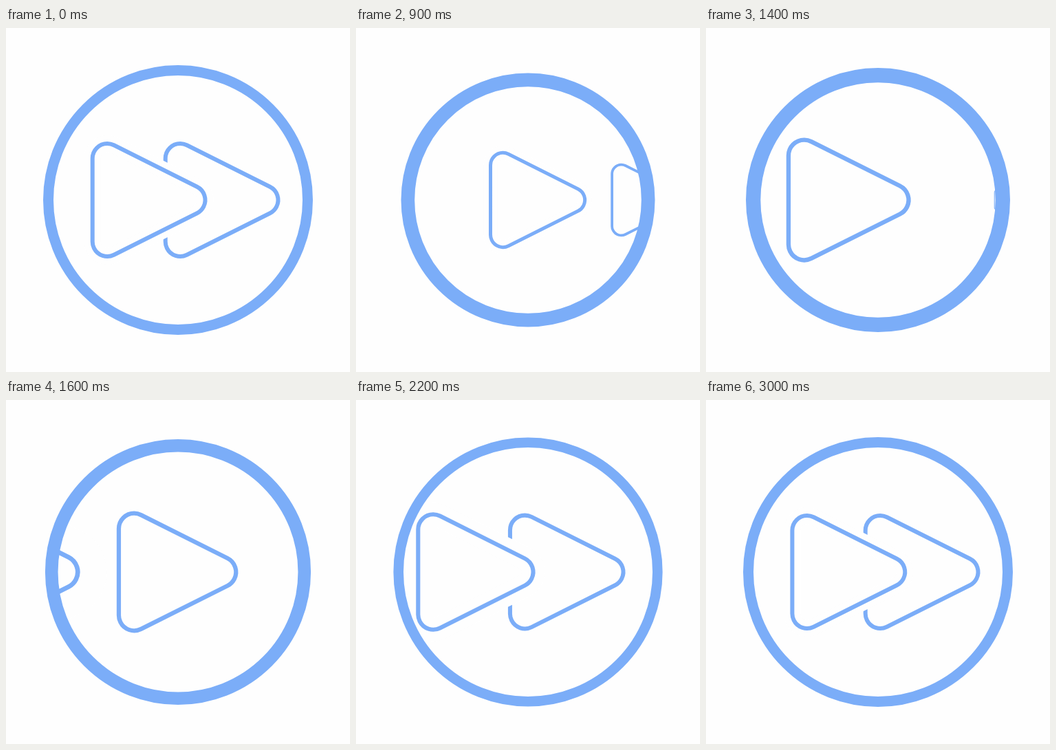
Recreate the animation shown at these times as an HTML page with a canvas. Size 500x500 px, loop 3.7 s.

```html
<!DOCTYPE html>
<html lang="en">
<head>
<meta charset="utf-8">
<title>Fast forward</title>
<style>
  html, body { margin: 0; width: 100%; height: 100%; overflow: hidden; background: #fefefe; }
  canvas { display: block; width: 100vmin; height: 100vmin; }
</style>
</head>
<body>
<canvas width="500" height="500"></canvas>
<script>
const ctx = document.querySelector('canvas').getContext('2d');
const BLUE = '#7badf8', PAPER = '#fefefe';
const LOOP = 3700, CENTER = 250;
const LEFT_X = 122.7, RIGHT_X = 228.7;   // resting left edges
const LEFT_OUT_DELAY = 1.3, LEFT_IN_DELAY = 3.8;

// [step, value] pairs for the ring
const RING_RADIUS = [[0, 196], [1, 193.3], [4, 184.5], [5.5, 184], [9, 192], [13, 194.2], [17, 195.6], [18, 196]];
const RING_WIDTH = [[0, 15], [1, 15.4], [4, 19.7], [6.5, 22.5], [9, 21.3], [13, 16], [17, 14.6], [24, 15]];

function valueAt(keys, step) {
  const next = keys.findIndex(([s]) => s >= step);
  if (next < 0) return keys[keys.length - 1][1];
  if (next === 0) return keys[0][1];
  const [s0, v0] = keys[next - 1], [s1, v1] = keys[next];
  return v0 + (v1 - v0) * (step - s0) / (s1 - s0);
}

// Rounded triangle whose left outer edge is at x; halo clears what lies behind it
function triangle(x, scale, halo = 0) {
  const r = 21.5, tilt = Math.PI / 2 - Math.atan(0.5);
  ctx.save();
  ctx.translate(x, CENTER);
  ctx.scale(scale, scale);
  ctx.beginPath();
  ctx.arc(24.5, -60.5, r, Math.PI, 2 * Math.PI - tilt);
  ctx.arc(145.3, 0, r, -tilt, tilt);
  ctx.arc(24.5, 60.5, r, tilt, Math.PI);
  ctx.closePath();
  ctx.fillStyle = ctx.strokeStyle = PAPER;
  ctx.fill();
  if (halo) {
    ctx.lineWidth = 2 * halo;
    ctx.stroke();
  }
  ctx.strokeStyle = BLUE;
  ctx.lineWidth = 6;
  ctx.stroke();
  ctx.restore();
}

// Accelerates to the right while shrinking
function leave(x, step, halo) {
  const d = Math.min(296, 12 * Math.max(0, step) ** 1.78);
  triangle(x + d, Math.max(0.18, 1 - 0.002 * d - 0.0000045 * d * d), halo);
}

// Slides in from the left and settles, slightly oversized on the way
function enter(x, step, halo) {
  const rest = 112 * (Math.max(0, 24 - step) / 15) ** 3.5 + 12 * Math.max(0, 9 - step) ** 2;
  triangle(x - rest, 1 + rest * 0.1 / 170, halo && halo + rest * 0.125);
}

function draw(step) {
  const radius = valueAt(RING_RADIUS, step), width = valueAt(RING_WIDTH, step);
  ctx.fillStyle = PAPER;
  ctx.fillRect(0, 0, 500, 500);

  ctx.save();
  ctx.beginPath();
  ctx.arc(CENTER, CENTER, radius - width / 2, 0, 2 * Math.PI);
  ctx.clip();
  if (step < 10) {
    leave(RIGHT_X, step);
    leave(LEFT_X, step - LEFT_OUT_DELAY, 12);
  }
  if (step > 4) {
    enter(RIGHT_X, step);
    enter(LEFT_X, step - LEFT_IN_DELAY, 12);
  }
  ctx.restore();

  ctx.beginPath();
  ctx.arc(CENTER, CENTER, radius - width / 2, 0, 2 * Math.PI);
  ctx.strokeStyle = BLUE;
  ctx.lineWidth = width;
  ctx.stroke();
}

const start = performance.now();
function tick() {
  const t = (performance.now() - start) % LOOP;
  // The motion advances in 100 ms steps between two holds
  draw(Math.max(0, Math.min(25, Math.floor((t - 500) / 100))));
  requestAnimationFrame(tick);
}
tick();
</script>
</body>
</html>
```
